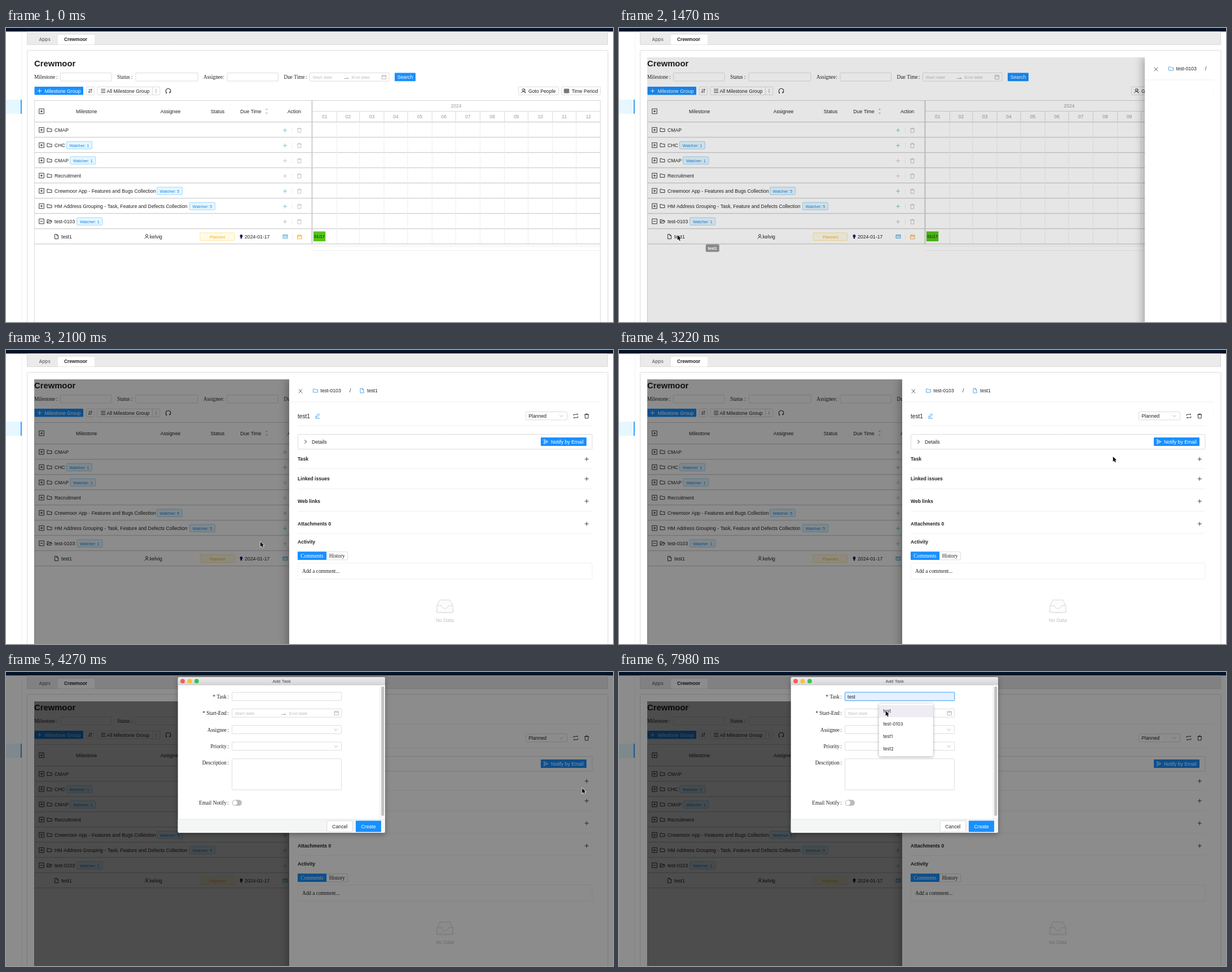
An HTML page with a canvas for the animation above (8 s loop, 1076 by 521 pixels).

```html
<!DOCTYPE html>
<html lang="en">
<head>
<meta charset="utf-8">
<title>Add a task</title>
<style>
html, body { margin: 0; width: 100%; height: 100%; overflow: hidden; background: #fff; }
canvas { display: block; }
</style>
</head>
<body>
<canvas id="stage" width="1076" height="521"></canvas>
<script>
const g = document.getElementById('stage').getContext('2d');
const LOOP = 8000, STEP = 70;
const SANS = '"Liberation Sans", Arial, sans-serif';
const SERIF = '"Liberation Serif", serif';
const INTER = 'Inter, sans-serif';
const BLUE = '#1890ff', INK = '#222', LINE = '#d9d9d9', PALE = '#bfbfbf', FAINT = '#efefef';
const APP = 'Crewmoor', USER = 'kelvig';

// ---- drawing helpers ----
function text(s, x, y, { size = 8.7, color = INK, font = SANS, weight = 400, align = 'left' } = {}) {
  g.font = `${weight} ${size}px ${font}`;
  g.fillStyle = color;
  g.textAlign = align;
  g.textBaseline = 'alphabetic';
  g.fillText(s, x, y + size * 0.35);
}
const serif = (s, x, y, o) => text(s, x, y, { size: 9.3, font: SERIF, ...o });

function box(x, y, w, h, fill, stroke, radius = 1) {
  g.beginPath();
  g.roundRect(x, y, w, h, radius);
  if (fill) { g.fillStyle = fill; g.fill(); }
  if (stroke) { g.strokeStyle = stroke; g.lineWidth = 0.9; g.stroke(); }
}

function rect(x, y, w, h, fill) { g.fillStyle = fill; g.fillRect(x, y, w, h); }
const hline = (x1, x2, y, color, w = 1) => rect(x1, y - w / 2, x2 - x1, w, color);
const vline = (x, y1, y2, color, w = 1) => rect(x - w / 2, y1, w, y2 - y1, color);

// Strokes an SVG path centred on x, y.
function icon(d, x, y, color = INK, width = 0.9, fill) {
  g.save();
  g.translate(x, y);
  const p = new Path2D(d);
  if (fill) { g.fillStyle = fill; g.fill(p); }
  g.strokeStyle = color;
  g.lineWidth = width;
  g.stroke(p);
  g.restore();
}

const ICON = {
  plus: 'M-3.5 0H3.5M0-3.5V3.5',
  expand: 'M-4.3-4.3H4.3V4.3H-4.3ZM-2.3 0H2.3M0-2.3V2.3',
  collapse: 'M-4.3-4.3H4.3V4.3H-4.3ZM-2.3 0H2.3',
  folder: 'M-4-3H-1L0-1.8H4V3H-4Z',
  open: 'M-3 3L-4 2.5V-3H-1L0-1.8H3V-.3M-4 3L-2-.3H4.5L2.8 3Z',
  doc: 'M-3-4H.8L3-1.8V4H-3ZM.6-4V-1.6H3',
  trash: 'M-4-2.5H4M-1.4-2.5V-4H1.4V-2.5M-3-2.5L-2.7 4H2.7L3-2.5',
  user: 'M-2-1.8A2 2 0 1 0 2-1.8A2 2 0 1 0-2-1.8M-3.4 3.8C-3 .2 3 .2 3.4 3.8',
  calendar: 'M-3.7-3H3.7V3.6H-3.7ZM-3.7-.8H3.7M-1.7-4V-2M1.7-4V-2',
  card: 'M-4-3H4V3H-4ZM-4-1.4H4M-2.4.9H-.4M.8.9H2.6',
  grid: 'M-4-3.2H4V3.4H-4ZM-4-1H4M-4 1.2H4M-1.3-3.2V3.4M1.4-3.2V3.4',
  down: 'M-3-1.6L0 1.8L3-1.6',
  right: 'M-1.8-3L1.8 0L-1.8 3',
  close: 'M-3.2-3.6L3.2 3.6M3.2-3.6L-3.2 3.6',
  arrow: 'M-4 1.5H4L1.6-.3',
  sort: 'M-1.5-3.5V3.5L-3.5 1.5M1.5 3.5V-3.5L3.5-1.5',
  menu: 'M-4-3H4M-4 0H4M-4 3H4',
  reload: 'M-2.5 3.6A4.3 4.3 0 1 1 2.5 3.6M2.5 3.9V1.6M-2.5 3.9H-4.2',
  edit: 'M-4 4H4M-2.8 2L-2.3-.2L1.8-4L3.6-2.2L-.6 1.6Z',
  swap: 'M-3.8-.6V-2.8H3.8L2-4M3.8.6V2.8H-3.8L-2 4',
  send: 'M-3.5-3.8L4 0L-3.5 3.8L-2.5 0ZM-2.5 0H1'
};

function button(label, x, y, w, h, o = {}) {
  box(x, y, w, h, o.fill || BLUE, o.stroke);
  text(label, o.tx ?? x + w / 2, y + h / 2 + 0.2, { color: o.color || '#fff', align: o.tx ? 'left' : 'center' });
}

function dateRange(x, y, w, arrowX, endX) {
  box(x, y, w, 14.7, '#fff', LINE);
  const o = { size: 8.1, color: PALE };
  text('Start date', x + 4.7, y + 7.5, o);
  icon(ICON.arrow, arrowX, y + 8.5, '#999', 0.8);
  text('End date', endX, y + 7.5, o);
  icon(ICON.calendar, x + w - 9, y + 7.4, '#aaa', 0.8);
}

// ---- page ----
function drawChrome() {
  rect(0, 0, 1076, 521, '#fff');
  rect(0, 0, 1076, 6.3, '#001529');
  vline(28.5, 6, 521, '#f2f2f2');
  rect(0, 127, 27, 25, '#e6f7ff');
  rect(26, 127, 1.7, 25, BLUE);
  box(37.5, 6.5, 1029, 23, '#ebebeb', '#d8d8d8', 0);
  box(91.5, 11.5, 66, 18, '#fff', '#e8e8e8', 2);
  text('Apps', 58.5, 20, { size: 8.2, font: INTER, weight: 500, color: '#666' });
  text(APP, 103, 20, { size: 8.3, weight: 700 });
  box(37.5, 39.5, 1029.5, 500, '#fff', LINE);
}

function drawFilters() {
  text(APP, 50, 62.5, { size: 14.8, weight: 700, color: '#1c1c1c' });
  for (const [label, x, colon, left, width] of [
    ['Milestone', 50, 89, 96.5, 90.5], ['Status', 197, 222, 230, 110],
    ['Assignee', 350, 384.5, 392, 90.5], ['Due Time', 492.5, 531, 0, 0]]) {
    serif(label, x, 87);
    serif(':', colon, 87);
    if (width) box(left, 79.6, width, 14.4, '#fff', LINE);
  }
  dateRange(538.5, 79.5, 140.5, 603, 612.5);
  button('Search', 689, 79.5, 37, 14.8);

  button('Milestone Group', 50.5, 104, 86.5, 14.6, { tx: 68.5 });
  icon(ICON.plus, 59.5, 111.4, '#fff');
  box(142.3, 104.3, 14, 14.2, '#fff', LINE);
  icon(ICON.sort, 149.3, 111.4);
  box(161.8, 104.3, 111, 14.2, '#fff', LINE);
  vline(259.5, 104, 118.5, LINE);
  icon(ICON.menu, 172.2, 111.5);
  text('All Milestone Group', 178.5, 111.5);
  for (const dy of [-2.5, 0, 2.5]) rect(265.5, 111 + dy, 1, 1, INK);
  icon(ICON.reload, 287.6, 111.5, INK, 1.1);
  box(908.4, 104.3, 71, 14.2, '#fff', LINE);
  icon(ICON.user, 917, 111.5);
  icon('M1.5-3.5A2 2 0 0 1 2.6 0M2.2.8Q4 1.5 4.3 3.6', 917, 111.5);
  text('Goto People', 926, 111.5);
  box(984.7, 104.3, 69, 14.2, '#fff', LINE);
  icon(ICON.grid, 993.7, 111.5);
  text('Time Period', 1002.7, 111.5);
}

// label, tag start, watchers, plus colour
const GROUPS = [
  ['CMAP', 0, 0, '#5ab5c4'], ['CHC', 107.5, 1, '#5ab5c4'], ['CMAP', 113.8, 1, '#bbb'],
  ['Recruitment', 0, 0, '#bbb'], [APP + ' App - Features and Bugs Collection', 267.5, 5, '#5ab5c4'],
  ['HM Address Grouping - Task, Feature and Defects Collection', 325.5, 5, '#5ab5c4'],
  ['test-0103', 125.8, 1, '#8fc0b0']];

function drawTable() {
  const border = '#d2d2d2';
  vline(50.5, 128, 521, LINE);
  vline(1053.5, 128, 521, LINE);
  hline(50, 1054, 128.5, border);
  for (let i = 0; i < 9; i++) hline(50, 1054, 166.6 + i * 27, border, 1.4);
  vline(542.5, 128, 383, '#c8c8c8', 1.8);

  icon(ICON.expand, 63, 147.5);
  const centred = { align: 'center' };
  for (const [s, x] of [['Milestone', 142.7], ['Assignee', 291.5], ['Status', 375], ['Due Time', 434], ['Action', 511]])
    text(s, x, 147.7, centred);
  icon('M-2-2.5L0-5L2-2.5ZM-2 2.5L0 5L2 2.5Z', 462, 147.5, '#bfbfbf', 0.3, '#bfbfbf');

  GROUPS.forEach(([label, tagX, count, plus], i) => {
    const y = 180.6 + i * 27, last = i === 6;
    icon(last ? ICON.collapse : ICON.expand, 63, y);
    icon(last ? ICON.open : ICON.folder, 77, y);
    text(label, 86, y);
    if (count) {
      box(tagX, y - 6.5, 45, 13.2, '#e6f7ff', '#91d5ff', 1.5);
      text('Watcher: ' + count, tagX + 22.5, y + 0.4, { size: 7.25, color: '#1880e0', align: 'center' });
    }
    icon(ICON.plus, 494.6, y + 0.6, plus, 0.8);
    vline(507.3, y - 4, y + 5, '#eee');
    icon(ICON.trash, 520, y + 0.6, '#b5b5b5', 0.8);
  });

  const y = 369.6;
  icon(ICON.doc, 89.5, y);
  text('test1', 98, y);
  icon(ICON.user, 249.5, y);
  text(USER, 254.7, y);
  box(344, 363, 61, 13.4, '#fffbe6', '#ffe58f', 1.5);
  text('Planned', 374.5, y + 0.4, { size: 7.4, color: '#f0ae2c', align: 'center' });
  icon('M-2.2-1A2.2 2.4 0 1 1 2.2-1Q2 .5 1 1.5V3.4H-1V1.5Q-2 .5-2.2-1', 417, y, '#1d1a5e', 0.6, '#1d1a5e');
  text('2024-01-17', 423, y);
  icon(ICON.card, 495, y, '#3f9fd8');
  vline(507.3, y - 4, y + 5, '#eee');
  icon(ICON.calendar, 520.3, y + 0.5, '#eba53a');
}

function drawTimeline() {
  const muted = { color: '#999', align: 'center', size: 8.5 };
  text('2024', 798, 138.3, muted);
  hline(543, 1054, 147.5, LINE);
  const perDay = 511 / 366;
  let x = 543;
  for (let m = 1; m <= 12; m++) {
    const w = new Date(2024, m, 0).getDate() * perDay;
    text(String(m).padStart(2, '0'), x + w / 2, 156.7, muted);
    if (m < 12) {
      vline(x + w, 147, 166, LINE);
      vline(x + w, 167, 382, '#ededed');
    }
    x += w;
  }
  box(545, 360.5, 21.3, 17.5, '#52c41a', null, 0);
  text('01/17', 555.7, 369.6, { size: 7.5, align: 'center', color: '#111' });
  hline(542, 1054, 386.5, '#eee');
  hline(542, 1054, 394.5, '#eee');
}

// ---- drawer ----
function drawDrawer(left, shown, bodyAlpha) {
  if (!shown) return;
  g.save();
  g.beginPath();
  g.rect(50, 52, 1004, 469);
  g.clip();
  rect(50, 52, 1004, 469, `rgba(0,0,0,${0.45 * shown})`);
  g.shadowColor = 'rgba(0,0,0,.28)';
  g.shadowBlur = 14;
  g.shadowOffsetX = -4;
  rect(left, 52, 560, 480, '#fff');
  g.shadowColor = 'transparent';

  g.translate(left - 502, 0);
  hline(502, 1054, 92, FAINT);
  icon(ICON.close, 522, 73, '#555');
  icon(ICON.folder, 548.5, 72, '#3f9fe8');
  text('test-0103', 557.5, 72);
  text('/', 609, 72);
  icon(ICON.doc, 631, 72, '#3f9fe8');
  text('test1', 640, 72);

  g.globalAlpha = bodyAlpha;
  text('test1', 517, 117, { size: 10.1 });
  icon(ICON.edit, 552, 117, BLUE);
  box(921.5, 109.5, 73, 14.4, '#fff', LINE);
  text('Planned', 926.3, 117);
  icon(ICON.down, 984.5, 116.8, '#aaa', 0.8);
  icon(ICON.swap, 1010, 117);
  icon(ICON.trash, 1029.3, 117);
  hline(517, 1039, 134, FAINT);
  box(517.5, 149.5, 521.5, 26.3, '#fff', LINE);
  icon(ICON.right, 531, 162.5);
  text('Details', 542, 162.7);
  button('Notify by Email', 948, 155, 81, 15, { tx: 966 });
  icon(ICON.send, 957, 162.5, '#fff');
  for (const [label, y, rule] of [['Task', 193.3, 210], ['Linked issues', 228.3, 246],
    ['Web links', 268, 286], ['Attachments 0', 308, 325]]) {
    text(label, 517, y, { weight: 700, size: 8.6 });
    icon(ICON.plus, 1029.3, y, '#333');
    hline(517, 1039, rule, FAINT);
  }
  text('Activity', 517, 340, { weight: 700, size: 8.6 });
  box(568, 357.7, 37.7, 14.2, '#fff', LINE);
  box(517, 357.3, 51, 14.8, BLUE);
  serif('Comments', 542.5, 365, { color: '#fff', align: 'center' });
  serif('History', 586.8, 365, { align: 'center' });
  box(517.5, 377.5, 521.5, 28.5, '#fff', FAINT);
  serif('Add a comment...', 525, 392);
  icon('M-17 9A17 3.5 0 0 0 17 9A17 3.5 0 0 0-17 9', 778, 454, '#f3f3f3', 0.5, '#f3f3f3');
  icon('M-14-1L-9-11H9L14-1V11H-14ZM-14-1H-6Q-5 4 0 4T6-1H14', 778, 454, '#d2d2d2', 0.9, '#fcfcfc');
  text('No Data', 778, 478.8, { color: PALE, align: 'center' });
  g.restore();
}

// ---- dialog ----
function drawDialog(p, input) {
  if (p <= 0) return;
  rect(0, 6.3, 1076, 515, `rgba(0,0,0,${0.45 * p})`);
  g.save();
  const scale = 0.2 + 0.8 * p;
  g.translate(1022, 193);
  g.scale(scale, scale);
  g.translate(-1022, -193);
  g.globalAlpha = p;

  g.shadowColor = 'rgba(0,0,0,.3)';
  g.shadowBlur = 10;
  g.shadowOffsetY = 3;
  box(304.7, 9, 367.3, 276, '#fff', null, 3);
  g.shadowColor = 'transparent';
  const bar = g.createLinearGradient(0, 9, 0, 23);
  bar.addColorStop(0, '#ebebeb');
  bar.addColorStop(1, '#d5d5d5');
  box(304.7, 9, 367.3, 14, bar, null, [3, 3, 0, 0]);
  hline(304.7, 672, 23, '#c4c4c4', 0.8);
  ['#fc5b57', '#fdbc40', '#34c748'].forEach((color, i) => box(309.2 + i * 12.4, 12.3, 7.8, 7.8, color, null, 4));
  text('Add Task', 488.7, 16.3, { size: 7.9, color: '#444', align: 'center' });

  rect(663, 23.4, 9, 238, '#fafafa');
  vline(663, 23.4, 261, '#e8e8e8');
  box(665.3, 25.5, 5, 229.5, '#c1c1c1', null, 2.5);
  box(304.7, 261, 367.3, 24, '#f4f5f5', null, [0, 0, 3, 3]);
  hline(304.7, 672, 261, '#e8e8e8');
  button('Cancel', 569, 263.7, 45.5, 19.5, { fill: '#fff', stroke: LINE, color: INK });
  button('Create', 620, 263.5, 45, 20);

  for (const [label, y] of [['* Task', 43.7], ['* Start-End', 73], ['Assignee', 102.4], ['Priority', 132],
    ['Description', 161.2], ['Email Notify', 231.5]]) {
    serif(label, 391, y, { align: 'right' });
    serif(':', 392.5, y);
  }
  drawTaskInput(input);
  dateRange(400.7, 65.4, 194, 492, 501.8);
  for (const y of [94.7, 124.2]) {
    box(400.7, y, 194, 14.7, '#fff', LINE);
    icon(ICON.down, 584.8, y + 7.4, '#aaa', 0.8);
  }
  box(400.7, 153.8, 194, 55, '#fff', LINE);
  box(400.7, 226.6, 17.3, 10.3, '#bbb', null, 5.2);
  box(401.7, 227.6, 8.3, 8.3, '#fff', null, 4.2);
  g.restore();
}

function drawTaskInput({ focused, value, caret, preview }) {
  if (focused) box(399.4, 34.7, 196.6, 17.2, '#d2eaff', null, 2);
  box(400.7, 36.1, 194, 14.5, preview ? '#e8f0fe' : '#fff', focused ? '#40a9ff' : LINE);
  text(value, 405, 43.6);
  if (caret) vline(405.5 + g.measureText(value).width, 38.5, 48.5, '#111', 0.9);
}

const HISTORY = [USER + '-test', 'test', '[Feature] Need the capability to update the address on a PC via a bind',
  'CMAP', 'Option 1 delivery', USER + '-test-task1'];
const MATCHES = ['test', 'test-0103', 'test1', 'test2'];

function drawSuggestions(items, width, highlighted) {
  g.save();
  g.shadowColor = 'rgba(0,0,0,.35)';
  g.shadowBlur = 5;
  g.shadowOffsetY = 1;
  box(460.8, 56, width, items.length * 22.1 + 5, '#fff', null, 3);
  g.restore();
  if (highlighted) rect(460.8, 58.5, width, 21.8, '#efecf3');
  items.forEach((s, i) => text(s, 468.2, 69.7 + i * 22.1, { size: 7.9, font: INTER }));
}

// ---- pointer ----
function drawPointer(x, y, beam) {
  g.save();
  g.translate(x, y);
  if (beam) {
    const d = 'M-2-5Q0-5 0-3.5Q0-5 2-5M0-3.5V4M-2 5Q0 5 0 3.5Q0 5 2 5M-1.2 1.5H1.2';
    icon(d, 0, 0, '#fff', 2);
    icon(d, 0, 0, '#111', 1);
  } else {
    icon('M0 0V8.8L2.1 6.9L3.5 10.1L5 9.4L3.6 6.3H6.3Z', 0, 0, '#fff', 1.3, '#000');
    g.fillStyle = '#000';
    g.fill(new Path2D('M0 0V8.8L2.1 6.9L3.5 10.1L5 9.4L3.6 6.3H6.3Z'));
  }
  g.restore();
}

// ---- timing ----
const POINTER = [
  [70, 706, 92], [490, 300, 380], [630, 92, 498], [840, 104, 367], [1470, 103.7, 367], [1610, 111.3, 366.5],
  [1680, 150, 367], [1820, 430, 368], [2030, 432, 368], [2450, 546, 200], [2660, 548, 150], [2870, 545, 203],
  [3080, 545, 207], [3220, 875.7, 189], [3430, 1000, 175], [3850, 1027, 188], [3990, 1027, 189],
  [4270, 1021.3, 206], [4480, 1021, 206], [4900, 500, 120], [5110, 366, 50], [5250, 434.5, 45],
  [7280, 434.5, 45], [7350, 446, 54], [7560, 447, 55], [7770, 471, 70], [7980, 472.7, 69]];
const DRAWER = [[1400, 1054, 0], [1470, 932, 0], [1540, 712, 0.2], [1610, 584, 0.55], [1680, 522, 0.8], [1750, 504, 0.93], [1820, 502, 1]];

// Linear interpolation over rows of [time, ...values].
function along(keys, t) {
  if (t <= keys[0][0]) return keys[0].slice(1);
  const i = keys.findIndex(k => k[0] >= t);
  if (i < 0) return keys[keys.length - 1].slice(1);
  const a = keys[i - 1], b = keys[i], k = (t - a[0]) / (b[0] - a[0]);
  return a.slice(1).map((v, n) => v + (b[n + 1] - v) * k);
}

const easeOut = p => 1 - (1 - Math.min(1, Math.max(0, p))) ** 3;

function render(t) {
  const typed = [6440, 6510, 6720, 6790].filter(at => t >= at).length;
  const focused = t >= 5320;
  const preview = t >= 7770;
  const caret = focused && !preview && !(t >= 5880 && t < 6370) && t < 7280;
  const [left, bodyAlpha] = along(DRAWER, t);

  drawChrome();
  drawFilters();
  drawTable();
  drawTimeline();
  drawDrawer(left, (1054 - left) / 552, bodyAlpha);
  if (t >= 980 && t < 1540) {
    box(153.7, 383.2, 24, 13.6, '#8a8a8a', null, 2);
    text('test1', 165.7, 390.2, { size: 6.8, color: '#fff', weight: 700, align: 'center' });
  }
  drawDialog(easeOut((t - 3900) / 360), { focused, value: 'test'.slice(0, typed), caret, preview });
  if (typed) drawSuggestions(MATCHES, 96, preview);
  else if (t >= 5390) drawSuggestions(HISTORY, 279.5, false);

  const [x, y] = along(POINTER, t);
  const hidden = t < 70 || (t >= 6440 && t < 7280);
  const beam = t >= 5250 && t < 7350;
  if (!hidden) drawPointer(x, y, beam);
}

function frame() {
  const t = performance.now() % LOOP;
  render(Math.floor(t / STEP) * STEP);
  requestAnimationFrame(frame);
}
frame();
</script>
</body>
</html>
```
